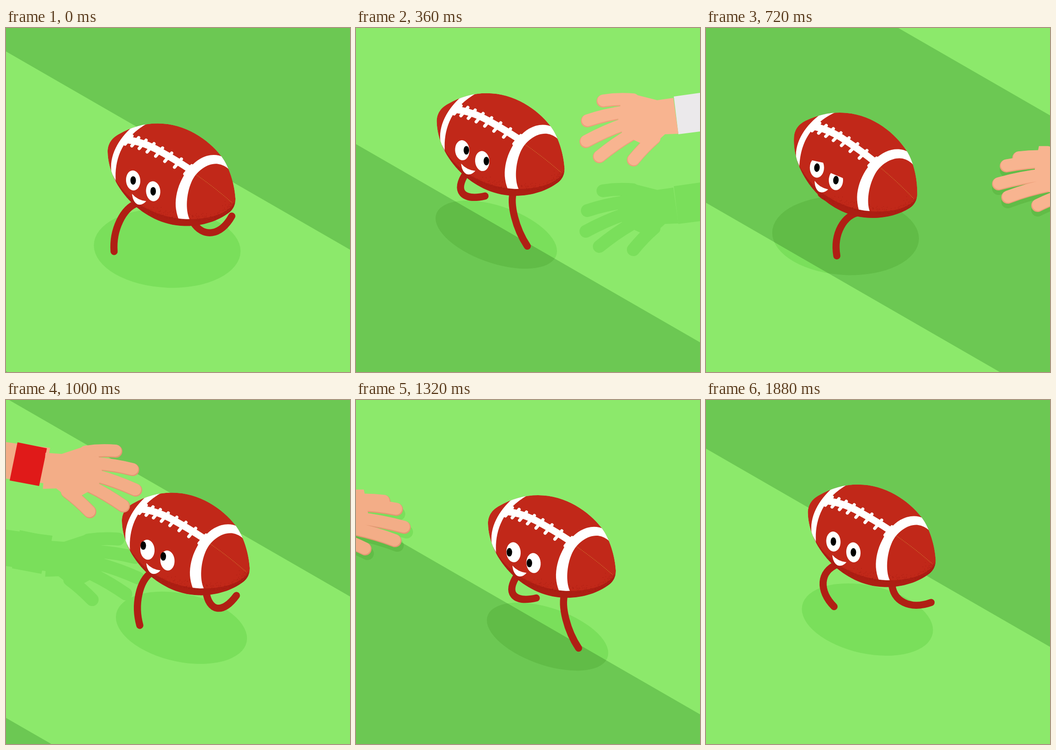
An HTML page with a canvas for the animation above (1920 ms loop, 748x748 px).

```html
<!DOCTYPE html>
<html lang="en">
<head>
<meta charset="utf-8">
<title>Running football</title>
<style>
html, body { margin: 0; width: 100%; height: 100%; overflow: hidden; background: #8ce96b; }
canvas { display: block; width: 100vmin; height: 100vmin; }
</style>
</head>
<body>
<canvas id="stage" width="748" height="748"></canvas>
<script>
const ctx = document.getElementById('stage').getContext('2d');
const SIZE = 748, LOOP = 1920, STEP = 40, STRIDE = 480;
const SLOPE = 431 / 748, PERIOD = 1316, LIGHT_BAND = 695;
const RED = '#c12819', LEG = '#b01f14';
const { PI, sin, cos, abs, min, max, sqrt, hypot } = Math;

// Key points: time, then values
const DRIFT = [[0, 350.5], [360, 305], [720, 303.5], [1000, 381.5], [1320, 416.5], [1600, 380.5], [1880, 351]];
const LEFT_FOOT = [[0, -125, 167], [40, -100, 177], [160, -9, 152], [240, 30, 40], [360, -34, 112], [440, -82, 154]];
const RIGHT_FOOT = [[0, 131, 90], [40, 110, 112], [160, 50, 155], [240, -41, 197], [360, 58, 221], [440, 129, 145]];
// A grab: ground x, ground y, height
const GRAB = [[200, 810, 440, 195], [360, 500, 442, 195], [400, 459, 449, 191], [520, 480, 455, 10], [720, 636, 349, 10], [880, 810, 250, 10]];

// Fingertips of the open and the closed hand
const OPEN_TIPS = [[37, -88], [3, -45], [0, 0], [29, 33], [103, 40]];
const SHUT_TIPS = [[44, -56], [17, -39], [0, 0], [20, 29], [85, 47]];

const HANDS = [
  { start: 0, dx: 0, dy: 0, skin: '#f8b490', shade: '#eda07b' },
  { start: 600, dx: 7, dy: -62, flip: true, skin: '#f3ad87', shade: '#e39872' }
];

const outline = new Path2D('M221 270C221 251 231 239 246 231C272 216 300 208 330 208C390 208 440 243 468 279C486 303 497 340 499 372C499 385 494 395 485 402C460 421 425 432 388 431C340 430 300 406 275 382C240 348 222 308 221 270Z');
const palm = new Path2D('M80 -104H100L155 -90L190 -95L201 -17L172 -16Q145 8 122 30L118 3L80 -15L70 -45L73 -69Z');

// Smooth pulse around a moment
const bump = (t, mid, width) => abs(t - mid) < width ? cos((t - mid) / width * PI / 2) ** 2 : 0;
const lerp = (a, b, k) => a + (b - a) * k;

function rng(seed) {
  return () => (seed = (seed * 16807) % 2147483647) / 2147483647;
}

// Smooth curve through key points; wraps around when a period is given.
function sample(keys, t, period) {
  const n = keys.length;
  const key = j => {
    if (!period) return keys[max(0, min(n - 1, j))];
    const [time, ...vals] = keys[(j + n) % n];
    return [time + Math.floor(j / n) * period, ...vals];
  };
  let i = n - 1;
  while (i > 0 && keys[i][0] > t) i--;
  const a = key(i - 1), b = key(i), c = key(i + 1), d = key(i + 2);
  const span = c[0] - b[0] || 1, u = (t - b[0]) / span, v = 1 - u;
  return b.slice(1).map((p, j) => {
    const q = c[j + 1];
    const m = (q - a[j + 1]) / (c[0] - a[0]) * span;
    const r = (d[j + 1] - p) / (d[0] - b[0]) * span;
    return p * (1 + 2 * u) * v * v + m * u * v * v + q * u * u * (3 - 2 * u) - r * u * u * v;
  });
}

function shape(d, color) {
  ctx.fillStyle = color;
  ctx.fill(new Path2D(d));
}

function stroke(path, color, width) {
  ctx.strokeStyle = color;
  ctx.lineWidth = width;
  ctx.stroke(path);
}

function oval(x, y, rx, ry, color, turn = 0) {
  ctx.beginPath();
  ctx.ellipse(x, y, rx, ry, turn, 0, 2 * PI);
  ctx.fillStyle = color;
  ctx.fill();
}

function darkBands(t) {
  const top = 51 + LIGHT_BAND - PERIOD * t / 960, h = PERIOD - LIGHT_BAND, drop = SLOPE * SIZE;
  ctx.beginPath();
  for (let k = -2; k < 4; k++) {
    const y = top + k * PERIOD;
    ctx.moveTo(0, y);
    ctx.lineTo(SIZE, y + drop);
    ctx.lineTo(SIZE, y + drop + h);
    ctx.lineTo(0, y + h);
    ctx.closePath();
  }
}

// Flatter and more slanted the higher the ball is
function bodyShadow(x, y, lift, color) {
  const w = 159.5 - 27.5 * lift, h = 86 - 12 * lift;
  const k = (1000 + 3700 * lift) / w;
  ctx.save();
  ctx.transform(w, k, 0, sqrt(h * h - k * k), x, y);
  oval(0, 0, 1, 1, color);
  ctx.restore();
}

function drawHand(hand, t, shadow) {
  const { start, flip, dx, dy, skin, shade } = hand;
  const time = t - start;
  if (time < GRAB[0][0] || time > GRAB[GRAB.length - 1][0]) return;
  const [x, y, height] = sample(GRAB, time);
  const h = max(8, min(195, height)), shut = 1 - (h - 8) / 187;
  const flat = shadow || skin;

  ctx.save();
  if (flip) { ctx.translate(SIZE, 0); ctx.scale(-1, 1); }
  ctx.translate(x + dx - (shadow && flip ? 5 : 0), y + dy - (shadow ? 0 : h));
  ctx.lineCap = 'round';
  if (flip) {
    shape('M186 -92L257 -101L420 -124V-46L274 -24L200 -15Z', flat);
    shape('M193 -91L257 -104L274 -21L210 -9Z', shadow || '#e01a19');
    ctx.rotate(0.07 * (1 - shut));
  } else {
    shape('M191 -98L420 -130V-44L201 -16Z', shadow || '#ebe9eb');
  }

  const fingers = OPEN_TIPS.map(([ox, oy], i) => {
    const tx = lerp(ox, SHUT_TIPS[i][0], shut), ty = lerp(oy, SHUT_TIPS[i][1], shut);
    const angle = (2 + 11 * i) * (1 - 0.55 * shut) * PI / 180;
    const len = 65 + 25 * sin(PI * i / 4) + 10 * shut;
    const bx = len * cos(angle), by = -len * sin(angle);
    const p = new Path2D();
    p.moveTo(tx, ty);
    p.quadraticCurveTo(tx + bx / 2, ty + by / 2 - 4, tx + bx, ty + by);
    return p;
  });
  if (!shadow) fingers.forEach(p => stroke(p, shade, 28));
  ctx.save();
  ctx.translate(8 * shut, 22 * shut);
  ctx.fillStyle = flat;
  ctx.fill(palm);
  ctx.restore();
  if (!shadow) ctx.translate(1, -1.5);
  fingers.forEach(p => stroke(p, flat, shadow ? 28 : 26));
  ctx.restore();
}

// The leg has a fixed length, so it bows out more as the foot nears the hip.
function drawLeg(x, y, hx, hy, [fx, fy]) {
  const dx = fx - hx, dy = fy - hy, d = hypot(dx, dy);
  const bow = (5 + 0.27 * sqrt(max(0, 125 * 125 - d * d))) / 0.75 / d;
  const at = k => [x + hx + dx * k - dy * bow, y + hy + dy * k + dx * bow];
  const p = new Path2D();
  p.moveTo(x + hx, y + hy);
  p.bezierCurveTo(...at(0.2), ...at(0.65), x + fx, y + fy);
  ctx.lineCap = 'round';
  stroke(p, LEG, 15.5);
}

function drawEye(x, y, lookX, lookY, lid, lidTop, lidSlant) {
  ctx.save();
  ctx.translate(x, y);
  const top = lidTop - 26 * (1 - lid);
  ctx.clip(new Path2D(`M-20 ${top}L20 ${top + lidSlant}V30H-20Z`));
  oval(0, 0, 15.5, 21.8, '#fff', -0.08);
  oval(lookX, lookY, 6, 9.3, '#000');
  ctx.restore();
}

function drawSpeckles() {
  const rand = rng(77);
  ctx.fillStyle = 'rgba(150,22,14,.38)';
  for (let i = 0; i < 420; i++) {
    const a = PI * (0.02 + 0.9 * rand()), far = 24 * rand() * rand();
    ctx.fillRect(362 + (136 - far) * cos(a), 352 + 22 * cos(a) + (64 - far) * sin(a), 1.4, 1.4);
  }
}

function drawLaces() {
  ctx.lineCap = 'round';
  stroke(new Path2D('M265 244Q298 248 334 268T400 308'), '#fff', 15);
  for (let i = 0; i < 8; i++) {
    const x = 274 + 14 * i + 0.65 * i * i, y = 235 + 3 * i + 0.9 * i * i;
    stroke(new Path2D(`M${x} ${y}l-15 18`), '#fff', 7);
  }
}

function drawBall(x, y, tilt, lookX, lookY, lid) {
  ctx.save();
  ctx.translate(x, y);
  ctx.rotate(tilt * PI / 180);
  ctx.translate(-360, -319.5);

  ctx.save();
  ctx.clip(outline);
  ctx.fillStyle = RED;
  ctx.fill(outline);
  drawSpeckles();
  shape('M284 208C254 230 224 270 229 312L239 340C235 296 245 242 309 207Z', '#fff');
  shape('M474 282C458 274 440 275 422 285C390 304 367 348 369 388Q370 402 375 415Q386 417 399 416C390 396 392 362 403 336C414 310 440 294 460 296Q475 298 486 309Z', '#fff');
  shape('M232 320C260 375 320 412 390 416C440 418 480 405 498 380L505 440H220Z', 'rgba(160,24,16,.6)');
  ctx.lineCap = 'butt';
  ctx.setLineDash([1.5, 2]);
  stroke(new Path2D('M414 320Q456 349 492 381'), '#cf7a31', 1.3);
  ctx.restore();

  drawLaces();
  drawEye(276.5, 332, lookX, lookY, lid, -16, 5);
  drawEye(320, 355.5, lookX, lookY, lid, -17, 13);
  shape('M274 361Q286 375 305 377Q296 387 286 384Q276 379 274 361Z', '#fff');
  ctx.restore();
}

function draw(t) {
  const lift = abs(sin(PI * t / 240)) ** 0.7;
  const lid = bump(t, 720, 260);
  const tilt = 5 * lid + 2.5 * bump(t, 1600, 260);
  const lookX = 9 * bump(t, 360, 300) - 9 * min(1, 2 * bump(t, 1160, 320));
  const lookY = -9 * bump(t, 1000, 280);

  // The ball dodges along the stripes
  const [gx] = sample(DRIFT, t, LOOP);
  const gy = 481.5 + 0.585 * (gx - 360) + 3 * (1 - lift);
  const x = gx + 9.5 + 2.5 * tilt, y = gy - 160 - 36 * lift + 7 * lid;

  const shadows = color => {
    HANDS.forEach(h => drawHand(h, t, color));
    bodyShadow(gx, gy, lift, color);
  };
  ctx.fillStyle = '#8ce96b';
  ctx.fillRect(0, 0, SIZE, SIZE);
  shadows('#7adf5b');
  ctx.save();
  darkBands(t);
  ctx.fillStyle = '#6cc853';
  ctx.fill();
  ctx.clip();
  shadows('#61bc47');
  ctx.restore();

  const stride = t % STRIDE;
  drawLeg(x, y, 28 + 18 * cos(2 * PI * stride / STRIDE), 102, sample(RIGHT_FOOT, stride, STRIDE));
  drawLeg(x, y, -75, 62, sample(LEFT_FOOT, stride, STRIDE));
  drawBall(x, y, tilt, lookX, lookY, lid);
  HANDS.forEach(h => drawHand(h, t));
}

const start = performance.now();
function tick() {
  const t = max(0, performance.now() - start) % LOOP;
  draw(Math.floor(t / STEP) * STEP);
  requestAnimationFrame(tick);
}
tick();
</script>
</body>
</html>
```
